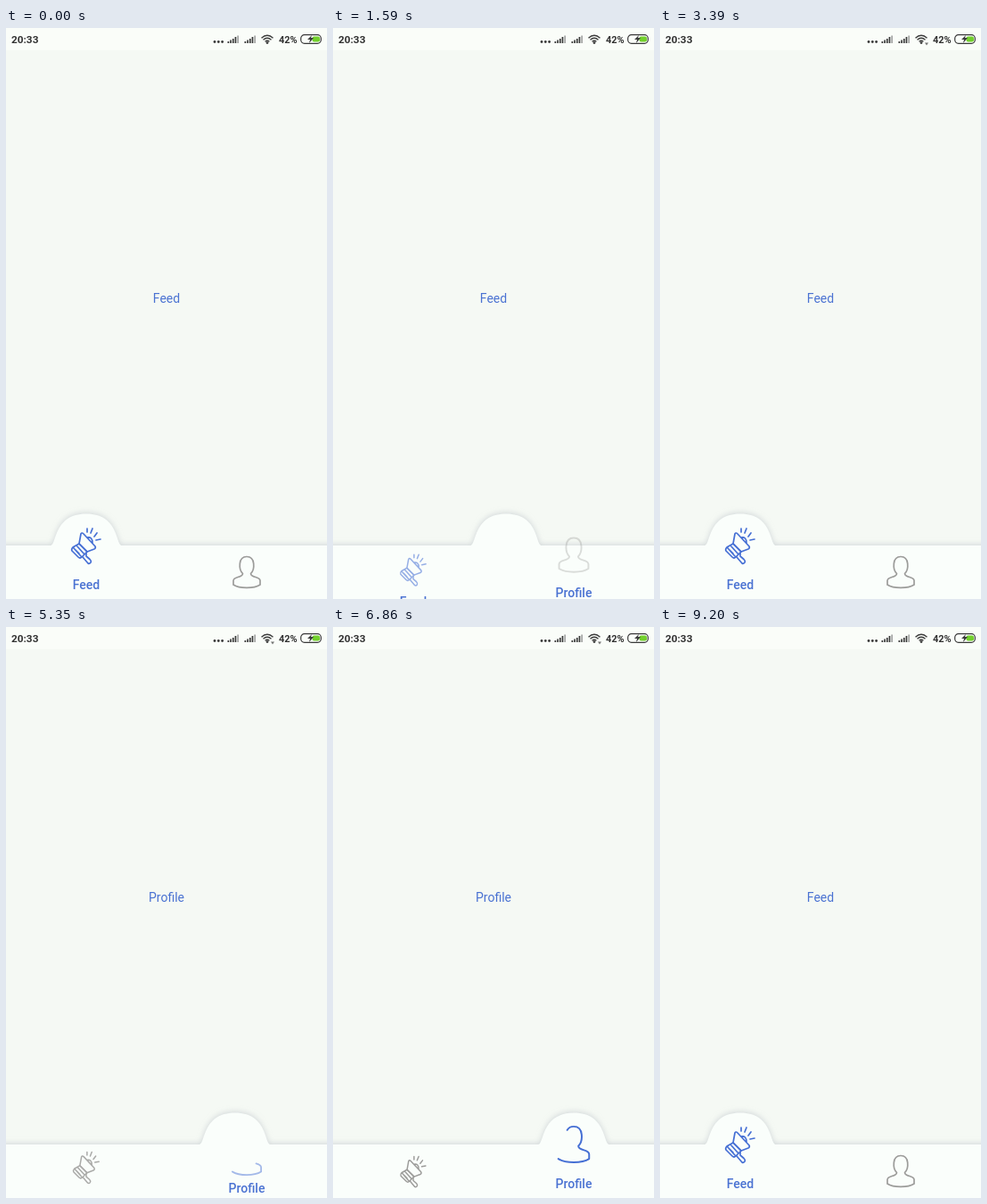
Write an HTML page that moves like this. It is 360x640 px and loops after 9.45 s.

```html
<!DOCTYPE html>
<html lang="en">
<head>
<meta charset="utf-8">
<title>Bottom navigation</title>
<style>
  html, body { margin: 0; width: 100%; height: 100%; overflow: hidden; background: #f5f9f4; }
  svg { display: block; width: 100%; height: 100%; }
  text { font: 14px Roboto, sans-serif; fill: #4a72d2; text-anchor: middle; }
  .label { font-weight: 500; }
  .status { font-weight: 600; fill: #333; text-anchor: start; }
  .icon { fill: none; stroke-width: 1.7; stroke-linecap: round; stroke-linejoin: round; }
  #bar { filter: drop-shadow(0 -1px 3px #b9c0c699); }
</style>
</head>
<body>
<svg viewBox="0 0 360 640">
  <rect width="360" height="640" fill="#f5f9f4"/>
  <rect width="360" height="25" fill="#fafdf9"/>

  <text class="status" x="6" y="17" style="font-size:11.8px">20:33</text>
  <text class="status" x="306" y="17" style="font-size:11px">42%</text>
  <g fill="#3a3a3a">
    <circle cx="234" cy="15.5" r="1.4"/><circle cx="238.3" cy="15.5" r="1.4"/><circle cx="242.6" cy="15.5" r="1.4"/>
    <g id="bars"><path d="M248.5 15h1.7v2h-1.7zM251.2 13.5h1.7v3.5h-1.7zM253.9 12h1.7v5h-1.7zM256.6 10h1.7v7h-1.7z"/>
      <path d="M259.3 8.5h1.7v8.5h-1.7z" opacity=".45"/></g>
    <use href="#bars" x="19"/>
    <circle cx="293" cy="16.6" r="1.4"/>
    <path id="traffic" d="M297 16.5h4l-2 3z"/>
  </g>
  <g fill="none" stroke="#3a3a3a" stroke-width="1.4">
    <path d="M286.5 11.2Q293 5.5 299.5 11.2M288.5 13.2Q293 9.2 297.5 13.2M290.6 15.2Q293 13.2 295.4 15.2"/>
    <rect x="330.7" y="7.7" width="22.6" height="9.6" rx="4" stroke-width="1.2"/>
  </g>
  <rect x="343.500" y="9.500" width="8.500" height="6" rx="2" fill="#72d02c"/>
  <path d="M343 8l-5 5h3l-1 4 5-6h-3z" fill="#3a3a3a"/>

  <text id="content" x="180" y="307.5"></text>
  <path id="bar" fill="#fafefb"/>
  <g id="megaphone" class="icon">
    <path d="M-8-2L-6-13Q-5-15-3-13L10 1Q11 3 9 4L1 7ZM1-9Q7-10 7-3"/>
    <path d="M-8-2L1 7L-5 13Q-7 15-9 13L-16 6Q-17 4-15 2ZM-11 0L-2 10M-14 3L-6 12M-12 5L-8 9"/>
    <path d="M-4 13L2 20Q3.500 21 5 19Q6 17.500 4 15.500L0 12V8"/>
    <path d="M1-19V-15M5-14L7-19M9-10L12-14M11-6L16-7"/>
  </g>
  <g id="person" class="icon">
    <path pathLength="1" d="M-15 14C-8 18.500 8 18.500 15 14V9.500Q15 7 10 5.500Q4.500 4 4.500 1.500C9-3 10-17.500 0-17.500C-10-17.500-9-3-4.500 1.500Q-4.500 4-10 5.500Q-15 7-15 9.500Z"/>
  </g>
  <text id="feedLabel" class="label" x="90">Feed</text>
  <text id="profileLabel" class="label" x="270">Profile</text>
</svg>
<script>
const LOOP = 9450;
const TAPS = [570, 1465, 2110, 2950, 5120, 5850, 6420, 7020]; // alternately Profile, Feed
const BLUE = '#456fd4', GRAY = '#9c9c9a';
const byId = id => document.getElementById(id);
const bar = byId('bar'), outline = byId('person').firstElementChild;

const tabs = [
  { name: 'Feed', x: 90, size: 1, faint: 0.5, icon: byId('megaphone'), label: byId('feedLabel') },
  { name: 'Profile', x: 270, size: 1.15, faint: 0, icon: byId('person'), label: byId('profileLabel') }
];

function ease(elapsed, duration) {
  const p = Math.min(1, Math.max(0, elapsed / duration));
  return (1 - Math.cos(Math.PI * p)) / 2;
}

function drawTab(tab, active, elapsed) {
  const shift = ease(elapsed, 320);
  const lift = active ? ease(elapsed - 50, 370) : 1 - ease(elapsed, 310);
  const scale = tab.size * (0.87 + 0.13 * lift);
  tab.icon.setAttribute('transform', `translate(${tab.x} ${610 - 30 * lift}) scale(${scale})`);
  tab.icon.style.stroke = active ? BLUE : GRAY;
  tab.icon.style.opacity = active ? tab.faint + (1 - tab.faint) * lift : 1 - lift;
  tab.label.setAttribute('y', 629 + 28 * (active ? 1 - shift : shift));
}

function drawBar(x) {
  bar.setAttribute('d', `M-20 660V580H${x - 40}C${x - 33} 580 ${x - 37} 544.5 ${x} 544.5` +
    `C${x + 37} 544.5 ${x + 33} 580 ${x + 40} 580H380V660Z`);
}

function render(time) {
  const count = TAPS.filter(tap => tap <= time).length;
  const selected = count % 2;
  const elapsed = count ? time - TAPS[count - 1] : Infinity;
  const from = tabs[1 - selected].x, to = tabs[selected].x;

  drawBar(from + (to - from) * ease(elapsed, 280));
  tabs.forEach((tab, i) => drawTab(tab, i === selected, elapsed));

  // The person is traced from its lower left corner once selected.
  const traced = selected ? Math.min(1, elapsed / 630) : 1;
  outline.style.strokeDasharray = traced < 1 ? `${traced} 2` : 'none';

  byId('content').textContent = tabs[selected].name;
  byId('traffic').style.opacity = time >= 2130 && time < 9200 ? 0.7 : 0;
}

const start = performance.now();
function tick() {
  render((performance.now() - start) % LOOP);
  requestAnimationFrame(tick);
}
tick();
</script>
</body>
</html>
```
